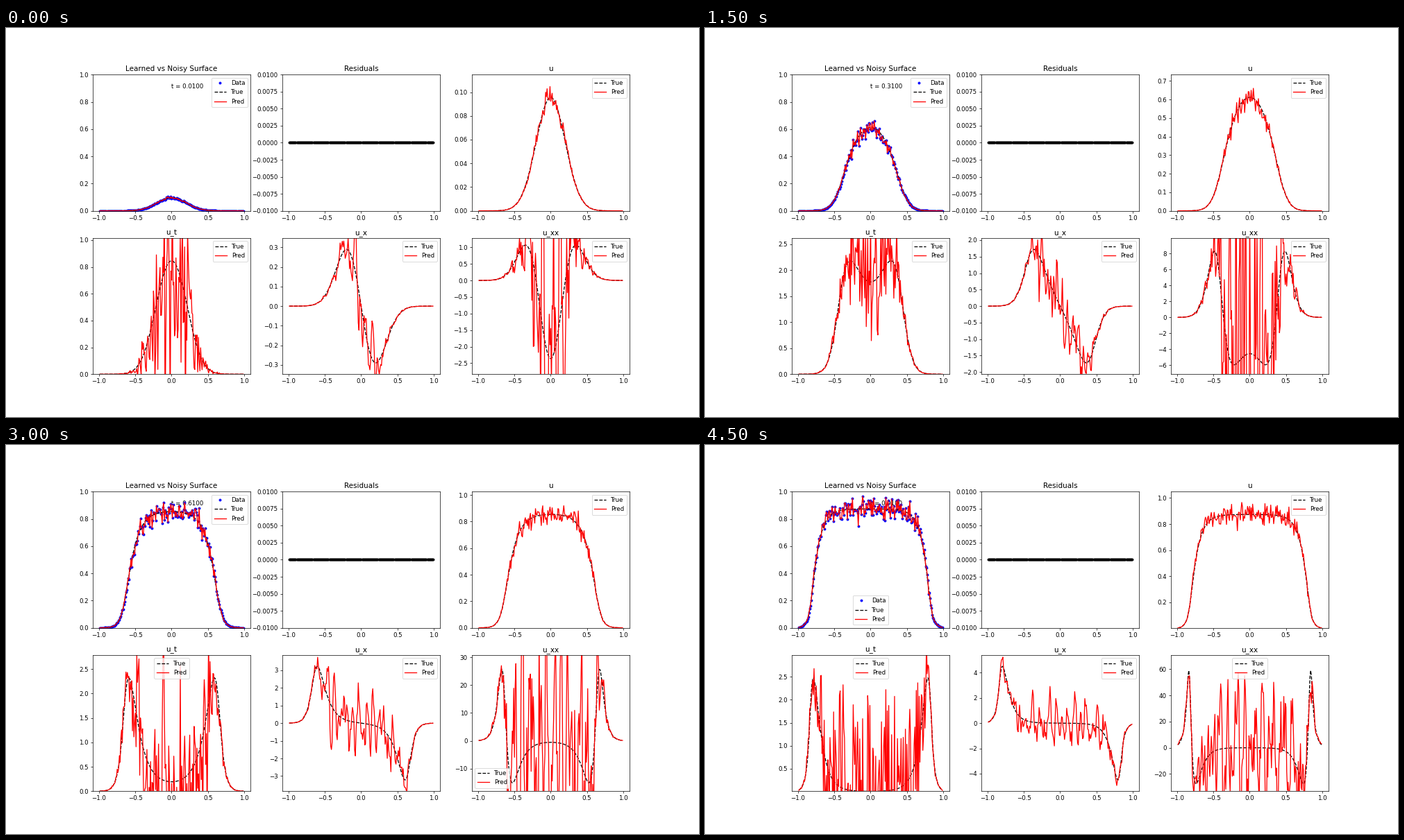
Recreate the animation shown at these times as a matplotlib script. Size 998 by 561 pixels, loop 5000 ms.

```python
import numpy as np
import matplotlib.pyplot as plt
from matplotlib.animation import FuncAnimation

W, H, DPI = 998, 561, 62.375
FRAMES, INTERVAL = 10, 500

# u_t = D (u u_x)_x + R u (1 - u), shown scaled by S
D, R, S = 0.02, 10.0, 0.8747
NOISE = 0.05
DX, DT = 0.005, 0.0002
grid = np.linspace(-1.1, 1.1, 441)
HALF = 5                        # half width of the derivative fits
STEP = 2
h = STEP * DX
DATA = slice(22 - HALF * STEP, 419 + HALF * STEP, STEP)
x = grid[DATA][HALF:-HALF]

# Rows of the least-squares cubic give the derivative kernels
window = np.arange(-HALF, HALF + 1) * h
cubic = np.linalg.pinv(np.vander(window, 4, increasing=True))
K1, K2 = cubic[1], 2 * cubic[2]


def rate(u):
    flux = D * (u[1:] + u[:-1]) / 2 * np.diff(u) / DX
    return np.diff(flux, prepend=0, append=0) / DX + R * u * (1 - u)


def solve():
    """Solution at t = 0.01, 0.11, ..., 0.91."""
    u = 0.1 * np.exp(-12.5 * grid**2)
    out = []
    steps = [round(0.01 / DT)] + [round(0.1 / DT)] * (FRAMES - 1)
    for n in steps:
        for _ in range(n):
            a = rate(u)
            u = u + DT / 2 * (a + rate(u + DT * a))
        out.append(u)
    return out


def fit(values, kernel):
    return np.correlate(values, kernel, "valid")


def surfaces(i, u):
    """True and predicted u, u_t, u_x, u_xx on the sample points."""
    rng = np.random.default_rng(40 + i)
    ux = np.gradient(u, DX)
    uxx = np.zeros_like(u)
    uxx[1:-1] = np.diff(u, 2) / DX**2
    wide = [S * f[DATA] for f in (u, rate(u), ux, uxx)]
    true = [f[HALF:-HALF] for f in wide]
    eps = np.clip(rng.normal(0, NOISE, wide[0].size), -2.85 * NOISE, 2.85 * NOISE)
    noisy = wide[0] * (1 + eps)
    # the one-sided slope at the first time is much rougher
    gain = 5.6 if i == 0 else 1.3
    pred = [
        noisy[HALF:-HALF],
        true[1] + gain * true[0] * rng.normal(size=x.size),
        fit(noisy, K1),
        fit(noisy, K2),
    ]
    return true, pred


states = [surfaces(i, u) for i, u in enumerate(solve())]

fig, axes = plt.subplots(2, 3, figsize=(W / DPI, (H + 0.001) / DPI), dpi=DPI)
fig.subplots_adjust(left=0.125, right=0.9, bottom=0.11, top=0.88,
                    wspace=0.2, hspace=0.2)
surf, resid, *panels = axes.flat
PAD = 0.05 * (x[-1] - x[0])
titles = ["Learned vs Noisy Surface", "Residuals", "u", "u_t", "u_x", "u_xx"]
for ax, title in zip(axes.flat, titles):
    ax.set_title(title)
    ax.set_xlim(x[0] - PAD, x[-1] + PAD)


def pair(ax):
    true, = ax.plot(x, 0 * x, "k--", label="True")
    pred, = ax.plot(x, 0 * x, "r-", label="Pred")
    return true, pred


dots, = surf.plot(x, 0 * x, "b.", markersize=7, label="Data")
surf_lines = pair(surf)
surf.set_ylim(0, 1)
clock = surf.text(0, 0.9, "", zorder=1)
resid.plot(x, 0 * x, "k.", markersize=7)
resid.set_ylim(-0.01, 0.01)
lines = [pair(ax) for ax in panels]
legends = [ax.legend(loc="upper right") for ax in [surf] + panels]


def limits(values):
    """Scaled range; a bottom within a fraction of a pixel of zero is zero."""
    lo, hi = 1.2 * values.min(), 1.2 * values.max()
    return (0 if 0 < lo < 0.002 * hi else lo), hi


def legend_places(i):
    surf_loc = "upper right" if i < 8 else "lower center"
    ut_loc = "upper right" if i < 6 else "upper center"
    uxx_loc = ("upper right" if i < 4 else
               "lower left" if i < 7 else "upper center")
    return surf_loc, "upper right", ut_loc, "upper right", uxx_loc


def draw(i):
    true, pred = states[i]
    dots.set_ydata(pred[0])
    surf_lines[0].set_ydata(true[0])
    surf_lines[1].set_ydata(pred[0])
    clock.set_text(f"t = {0.01 + 0.1 * i:.4f}")
    for ax, (a, b), t, p in zip(panels, lines, true, pred):
        a.set_ydata(t)
        b.set_ydata(p)
        ax.set_ylim(*limits(t))
    for leg, loc in zip(legends, legend_places(i)):
        leg.set_loc(loc)
    return []


anim = FuncAnimation(fig, draw, frames=FRAMES, interval=INTERVAL,
                     init_func=lambda: draw(0), repeat=True, repeat_delay=0)
plt.show()
```
